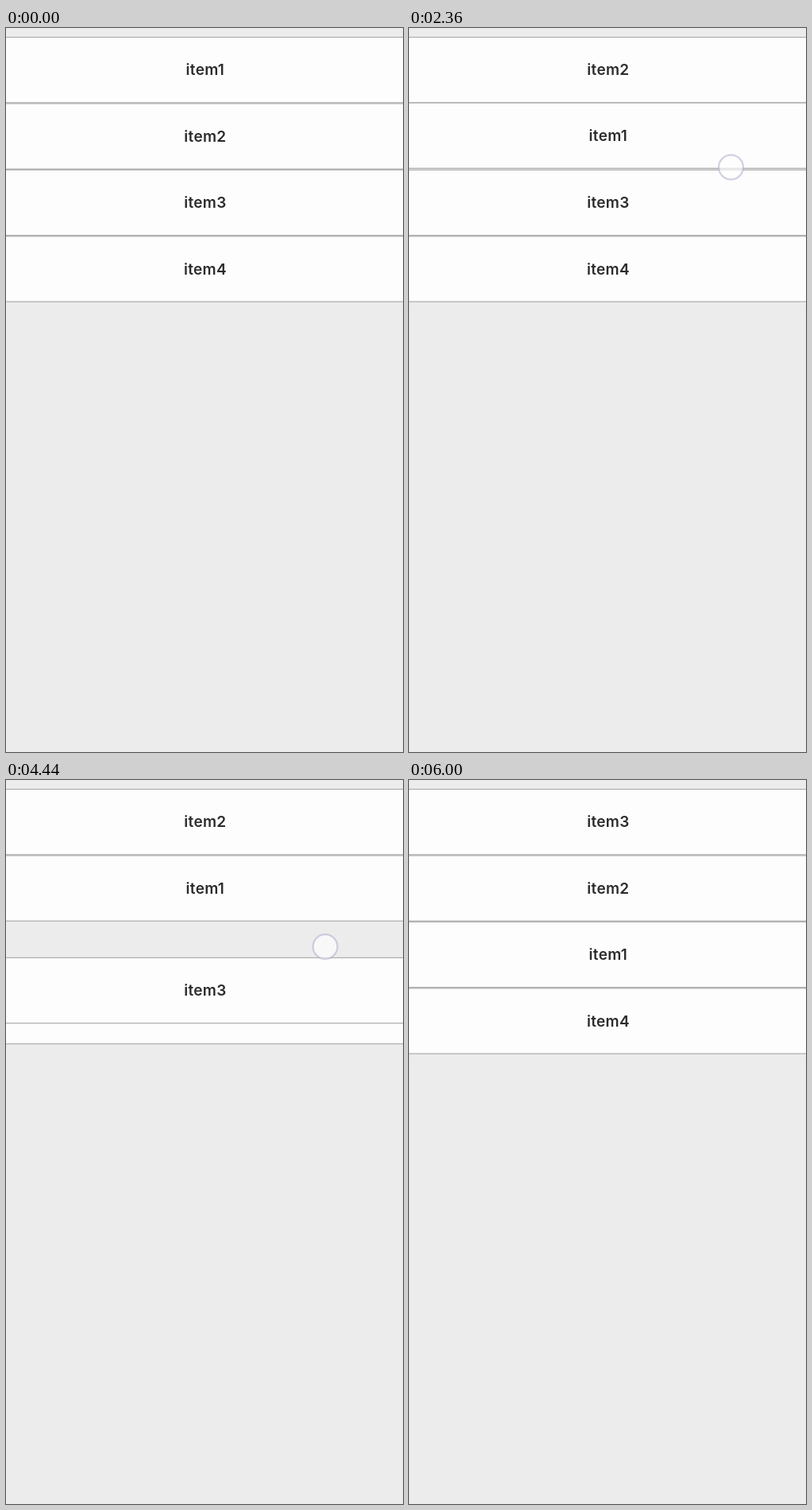
Write an HTML page that moves like this. It is 500 by 910 pixels and loops after 6.04 s.

```html
<!DOCTYPE html>
<html lang="en">
<head>
<meta charset="utf-8">
<title>Sortable list</title>
<style>
  html, body { margin: 0; width: 100%; height: 100%; overflow: hidden; background: #ececec; }
  svg { display: block; width: 500px; height: 910px; }
  text { font: 600 19px Inter, Roboto, sans-serif; letter-spacing: .3px; fill: #2c2c2e; text-anchor: middle; }
</style>
</head>
<body>
<svg id="stage" viewBox="0 0 500 910">
  <clipPath id="list"><rect y="11" width="500" height="899"/></clipPath>
  <g id="rows" clip-path="url(#list)"></g>
  <circle id="touch" r="15.4" fill="#fff" fill-opacity=".62" stroke="#b0acd0" stroke-opacity=".55" stroke-width="2.2"/>
</svg>
<script>
const LOOP = 6040, TICK = 40, TOP = 11, PITCH = 83.4, BORDER = 1.2;
const NS = 'http://www.w3.org/2000/svg';
const rowsGroup = document.getElementById('rows');
const touch = document.getElementById('touch');

function add(parent, tag, attrs) {
  const el = document.createElementNS(NS, tag);
  for (const key in attrs) el.setAttribute(key, attrs[key]);
  return parent.appendChild(el);
}

// Smooth monotone curve through key points [time, ...values]; reads value number k.
function along(points, t, k = 1) {
  const slope = i => {
    const [a, b, c] = [points[i - 1], points[i], points[i + 1]];
    if (!a || !c) return 0;
    const left = (b[k] - a[k]) / (b[0] - a[0]), right = (c[k] - b[k]) / (c[0] - b[0]);
    return left * right > 0 ? 2 * left * right / (left + right) : 0;
  };
  const i = points.findIndex(p => p[0] >= t);
  if (i < 0) return points[points.length - 1][k];
  if (i === 0) return points[0][k];
  const from = points[i - 1], to = points[i];
  const d = to[0] - from[0], u = (t - from[0]) / d, w = 1 - u;
  return from[k] * (1 + 2 * u) * w * w + slope(i - 1) * d * u * w * w
       + to[k] * u * u * (3 - 2 * u) - slope(i) * d * u * u * w;
}

// Underdamped step from 0 to 1.
function spring(ms) {
  if (ms <= 0) return 0;
  const s = ms / 1000, decay = 8.06, freq = 10.2;
  return 1 - Math.exp(-decay * s) * (Math.cos(freq * s) + decay / freq * Math.sin(freq * s));
}

// item: held row; dir: way it goes; swaps: when each neighbour makes room;
// travel: [time, rows moved]; finger: [time, x, y].
const drags = [
  { item: 0, dir: 1, start: 360, end: 2560, swaps: [939],
    travel: [[600, 0], [1080, 1.06], [1800, 1.08], [2360, .99], [2560, 1]],
    finger: [[400, 405, 84], [1080, 405.5, 163.5], [1800, 405.5, 184], [2360, 405.5, 175]] },
  { item: 3, dir: -1, start: 2600, end: 3880, swaps: [2965],
    travel: [[2800, 0], [3240, -.545], [3900, -1]],
    finger: [[2800, 390.5, 325.5], [3240, 410.5, 252], [3760, 410.5, 216]] },
  { item: 2, dir: -1, start: 4000, end: 5760, swaps: [4268, 4560, 4805],
    travel: [[4200, 0], [4440, -.46], [4760, -2.45], [5080, -2.344], [5680, -3]],
    finger: [[4040, 392, 318], [4440, 402, 209.5], [4680, 412, 64], [5080, 429.5, 92], [5640, 429.5, 60]] }
];

const order = [0, 1, 2, 3];
const shifts = drags.flatMap(({ item, dir, swaps }) => swaps.map(at => {
  const slot = order.indexOf(item), neighbour = order[slot + dir];
  order[slot] = neighbour;
  order[slot + dir] = item;
  return { item: neighbour, at, dir: -dir };
}));

const rows = [0, 1, 2, 3].map(i => {
  const g = add(rowsGroup, 'g', {});
  add(g, 'rect', { width: 500, height: PITCH, fill: '#adadad' });
  add(g, 'rect', { y: BORDER, width: 500, height: PITCH - 2 * BORDER, fill: '#fdfdfd' });
  add(g, 'text', { x: 250.9, y: 48.4 }).textContent = 'item' + (i + 1);
  return g;
});

let lifted = null;

function lift(item) {
  if (item === lifted) return;
  rows.forEach(row => rowsGroup.appendChild(row));
  rowsGroup.appendChild(rows[item]);
  lifted = item;
}

function render(t) {
  const slots = [0, 1, 2, 3];
  for (const { item, travel } of drags) slots[item] += along(travel, t);
  for (const { item, at, dir } of shifts) slots[item] += dir * spring(t - at);
  rows.forEach((row, i) =>
    row.setAttribute('transform', `translate(0 ${(TOP + slots[i] * PITCH).toFixed(2)})`));

  const drag = drags.filter(d => t >= d.start).pop();
  lift(drag ? drag.item : 3);

  const held = drag && t < drag.end;
  touch.setAttribute('visibility', held ? 'visible' : 'hidden');
  if (held) {
    touch.setAttribute('cx', along(drag.finger, t, 1));
    touch.setAttribute('cy', along(drag.finger, t, 2));
    touch.setAttribute('opacity', Math.min(1, (t - drag.start + TICK) / 80, (drag.end - t) / 120));
  }
}

const began = performance.now();
function loop() {
  const t = (performance.now() - began) % LOOP;
  render(Math.floor(t / TICK) * TICK);
  requestAnimationFrame(loop);
}
render(0);
requestAnimationFrame(loop);
</script>
</body>
</html>
```
